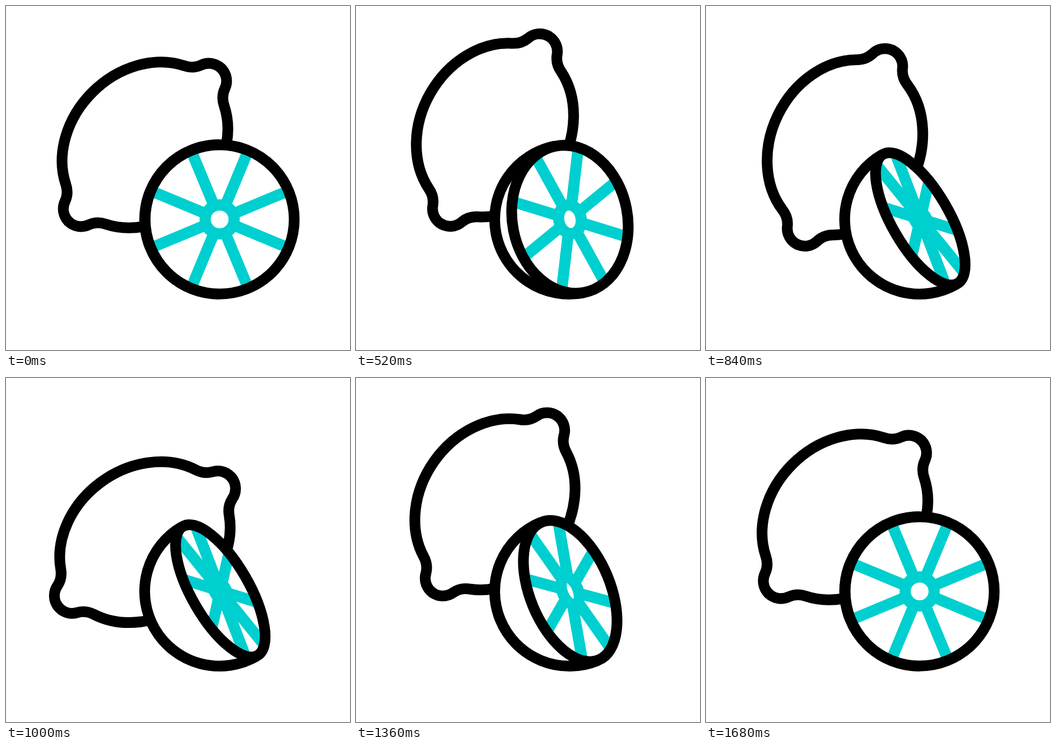
An HTML page without scripts that plays this animation: 640 by 640 pixels, repeating every 2 s.

```html
<!DOCTYPE html>
<html lang="en">
<head>
<meta charset="utf-8">
<title>Lemon and slice</title>
<style>
  @property --k { syntax: "<number>"; inherits: true; initial-value: 0; }

  html, body { margin: 0; width: 100%; height: 100%; overflow: hidden; background: #fff; }

  svg { display: block; width: 100%; height: 100%; animation: clock 2s infinite; }

  /* --k counts 35 picture steps of 40 ms between two rests */
  @keyframes clock {
    0%, 13.9% { --k: 0; animation-timing-function: steps(35); }
    83.9%, 100% { --k: 35; }
  }

  .ink { fill: none; stroke: #000; stroke-width: 20; }
  .pulp { fill: none; stroke: #00cfcf; stroke-width: 20.8; }
  .rind, .flesh { fill: #fff; }
  .rind { stroke: #000; stroke-width: 20; }
  .face * { vector-effect: non-scaling-stroke; }

  .lemon {
    /* height: leap, fall, hop, settle */
    --leap: clamp(0, var(--k) / 9.9, 1);
    --fall: clamp(0, (var(--k) - 9.9) / 7.9, 1);
    --hop: clamp(0, (var(--k) - 17.8) / 9.2, 1);
    --settle: clamp(0, (var(--k) - 27) / 8, 1);
    --y: calc(-20.9 * var(--leap)
      - 11.3 * (1 - cos(var(--leap) * 180deg))
      + 45.25 * (1 - cos(var(--fall) * 180deg))
      - 35.25 * (1 - cos(var(--hop) * 180deg))
      + 11.75 * (1 - cos(var(--settle) * 180deg)));

    /* tilt follows the height a little later */
    --lean: clamp(0, var(--k) / 10.5, 1);
    --swing: clamp(0, (var(--k) - 12) / 7, 1);
    --back: clamp(0, (var(--k) - 19) / 10, 1);
    --rest: clamp(0, (var(--k) - 29) / 6, 1);
    --tilt: calc(-6.4 * var(--lean)
      - 9.55 * (1 - cos(var(--lean) * 180deg))
      + 18 * (1 - cos(var(--swing) * 180deg))
      - 11.25 * (1 - cos(var(--back) * 180deg))
      + 6 * (1 - cos(var(--rest) * 180deg)));

    transform: translate(258.5px, calc(258.5px + var(--y) * 1px)) rotate(calc(var(--tilt) * 1deg));
  }

  .half {
    --open: clamp(0, (var(--k) - 1) / 12, 1);
    --close: clamp(0, (var(--k) - 23) / 12, 1);
    --turn: calc((cos(var(--close) * 180deg) - cos(var(--open) * 180deg)) / 2);
    transform: translate(397px, 397px) rotate(calc(var(--turn) * -30deg));
  }

  .face {
    transform: translate(calc(.5px + var(--turn) * 1.5px), 0) scale(calc(1 - var(--turn) * .615), 1);
  }
</style>
</head>
<body>
<svg viewBox="0 0 640 640">
  <g class="lemon">
    <g class="ink" transform="translate(-258.5 -258.5)" stroke-linecap="round">
      <path id="side" d="M116.5 401A33 33 0 0 1 110 363C115.5 351 114.5 341 111 331A168.6 139 -45 0 1 331 111C341 114.5 351 115.5 363 110A33 33 0 0 1 401 116.5"/>
      <use href="#side" transform="rotate(180 258.5 258.5)"/>
    </g>
  </g>

  <g class="half">
    <path class="rind" d="M0-139A139 139 0 0 0 0 139"/>
    <g class="face">
      <circle class="flesh" r="138.7"/>
      <g class="pulp">
        <path id="spokes" d="M10.7 25.9L51 123M25.9 10.7L123 51"/>
        <use href="#spokes" transform="rotate(90)"/>
        <use href="#spokes" transform="rotate(180)"/>
        <use href="#spokes" transform="rotate(270)"/>
        <circle r="27"/>
      </g>
      <circle class="ink" r="138.7"/>
    </g>
  </g>
</svg>
</body>
</html>
```
